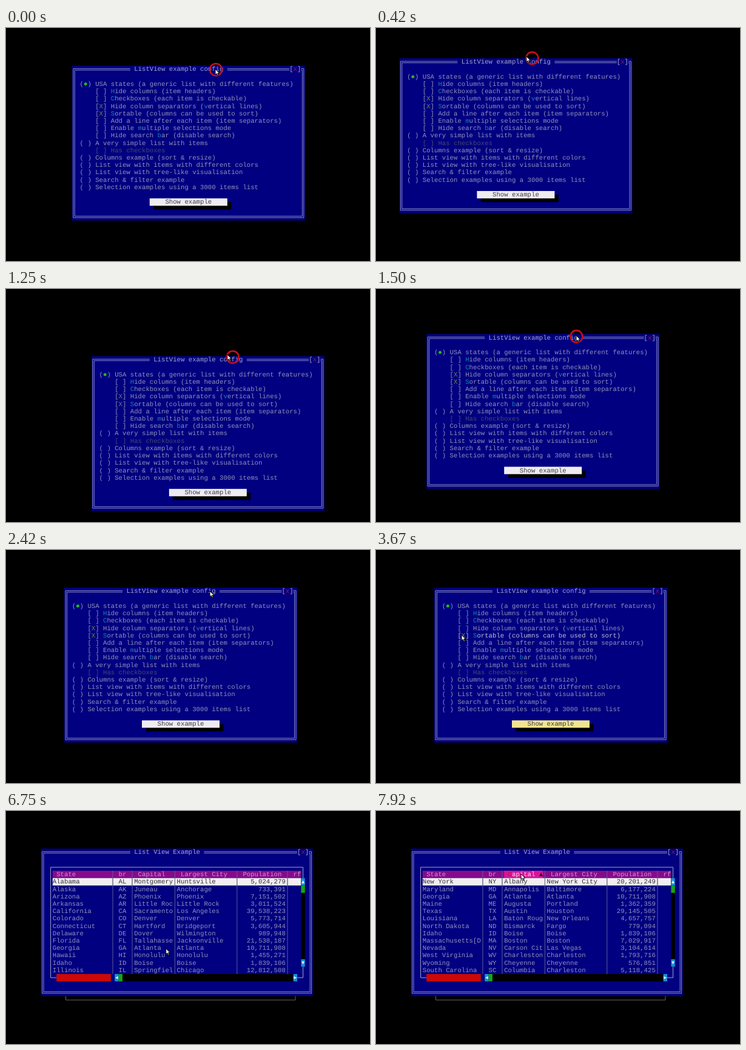
Write an HTML page with a canvas that moves like this. It is 600 by 386 pixels and loops after 8000 ms.

```html
<!DOCTYPE html>
<html lang="en">
<head>
<meta charset="utf-8">
<title>List view demo</title>
<style>
  html, body { margin: 0; width: 100%; height: 100%; overflow: hidden; background: #000; }
  canvas { display: block; width: 600px; height: 386px; }
</style>
</head>
<body>
<canvas id="stage" width="600" height="386"></canvas>
<script>
const ctx = document.getElementById('stage').getContext('2d');
const LOOP = 8000, CW = 6.4, CH = 12.22, TOP = 1.2;
const INK = '#9292bc', BRIGHT = '#c2c2d6', WHITE = '#f4f4f4', NAVY = '#000080', LINE = '#8c8cc4';
const DRAG_END = 2420, UNCHECK = 3420, PRESS = 5580, OPEN = 5830, SORT = 7420;

// Character grid helpers
const px = c => c * CW;
const py = r => TOP + r * CH;
const mid = r => py(r) + CH / 2;

function fill(c, r, w, h, color) {
  ctx.fillStyle = color;
  ctx.fillRect(px(c), py(r), w * CW, h * CH);
}

function text(c, r, str, color = INK) {
  ctx.fillStyle = color;
  [...str].forEach((ch, i) => {
    if (ch !== ' ') ctx.fillText(ch, px(c + i), py(r) + 9.1);
  });
}

function stroke(points, color, width = 1) {
  ctx.strokeStyle = color;
  ctx.lineWidth = width;
  ctx.beginPath();
  points.forEach(([x, y]) => ctx.lineTo(x, y));
  ctx.stroke();
}

function arrow(c, r, angle, color, size = 3) {
  ctx.save();
  ctx.translate(px(c + .5), mid(r));
  ctx.rotate(angle);
  ctx.fillStyle = color;
  ctx.beginPath();
  ctx.moveTo(0, -size);
  ctx.lineTo(size, size);
  ctx.lineTo(-size, size);
  ctx.fill();
  ctx.restore();
}

// Motion: [time, x, y] points joined by straight moves
const windowPath = [
  [0, 17, 5], [80, 17, 5], [420, 6, 4], [580, 0, 2], [660, 0, 2], [830, 10, 2],
  [920, 16, 3], [1080, 22, 6], [1170, 23, 9], [1250, 22, 9], [1330, 18, 8],
  [1420, 14, 6], [1500, 13, 6], [1580, 12, 6], [1670, 14, 6], [1830, 15, 6], [2000, 15, 5]
];
const mousePath = [
  [0, 345, 68], [80, 340, 68], [420, 248, 47], [560, 228, 31], [660, 240, 31],
  [920, 377, 62], [1080, 387, 110], [1170, 385, 117], [1330, 345, 100], [1450, 329, 78],
  [1500, 330, 77], [1580, 326, 79], [1670, 333, 80], [2000, 336, 68], [2580, 336, 68],
  [3250, 141, 129], [3420, 141, 129], [3580, 141, 140.5], [4830, 141, 140.5],
  [5250, 205, 245], [5500, 276, 290], [6500, 276, 290], [7250, 239, 104]
];

function along(path, t) {
  const n = path.findIndex(p => p[0] > t);
  if (n === 0) return path[0].slice(1);
  if (n < 0) return path[path.length - 1].slice(1);
  const a = path[n - 1], b = path[n], k = (t - a[0]) / (b[0] - a[0]);
  return [a[1] + (b[1] - a[1]) * k, a[2] + (b[2] - a[2]) * k];
}

function frame(c, r, w, h, title) {
  fill(c, r, w, h, NAVY);
  const x1 = px(c + .5), x2 = px(c + w - .5), y1 = mid(r) + .2, y2 = mid(r + h - 1) + .2;
  const t1 = c + Math.round((w - title.length) / 2) - 3;
  const start = px(t1 - 1), end = px(t1 + title.length + 1);
  for (const d of [-1.2, 1.2]) {
    stroke([[start, y1 + d], [x1 + d, y1 + d], [x1 + d, y2 - d],
            [x2 - d, y2 - d], [x2 - d, y1 + d], [px(c + w - 1), y1 + d]], LINE);
    stroke([[end, y1 + d], [px(c + w - 4), y1 + d]], LINE);
  }
  text(t1, r, title, '#a8a8cc');
  text(c + w - 4, r, '[ ]', '#a8a8cc');
  text(c + w - 3, r, 'x', '#a01458');
}

// Option rows: kind (r radio, c check, d disabled), label, index of the hotkey
const options = [
  ['r', 'USA states (a generic list with different features)'],
  ['c', 'Hide columns (item headers)', 0],
  ['c', 'Checkboxes (each item is checkable)', 0],
  ['c', 'Hide column separators (vertical lines)', 24],
  ['c', 'Sortable (columns can be used to sort)', 0],
  ['c', 'Add a line after each item (item separators)'],
  ['c', 'Enable multiple selections mode', 7],
  ['c', 'Hide search bar (disable search)', 12],
  ['r', 'A very simple list with items'],
  ['d', 'Has checkboxes'],
  ['r', 'Columns example (sort & resize)'],
  ['r', 'List view with items with different colors'],
  ['r', 'List view with tree-like visualisation'],
  ['r', 'Search & filter example'],
  ['r', 'Selection examples using a 3000 items list']
];

function drawOption(i, c, r, hot, t) {
  const [kind, label, key] = options[i];
  const radio = kind === 'r', x = c + (radio ? 2 : 6);
  const color = kind === 'd' ? '#484870' : hot ? BRIGHT : INK;
  text(x, r, radio ? '( )' : '[ ]', color);
  [...label].forEach((ch, n) => text(x + 4 + n, r, ch, n === key ? '#1284b8' : color));
  if (i === 0) {
    ctx.fillStyle = '#1fb81f';
    ctx.beginPath();
    ctx.arc(px(x + 1.5), mid(r), 2.5, 0, 7);
    ctx.fill();
  }
  if (i === 4 || (i === 3 && t < UNCHECK)) text(x + 1, r, 'X', '#6c8450');
}

function drawConfig(t, mouse) {
  const [c, r] = along(windowPath, t).map(Math.round);
  frame(c, r, 60, 21, 'ListView example config');
  const over = t < DRAG_END ? -1 : Math.floor((mouse[1] - TOP) / CH) - r - 2;
  options.forEach((o, i) => drawOption(i, c, r + 2 + i, i === over, t));

  const pressed = t >= PRESS, x = c + 20 + (pressed ? 1 : 0), y = r + 18;
  if (!pressed) {
    ctx.fillStyle = '#000';
    ctx.fillRect(px(x + 1), py(y) + CH / 2, 20 * CW, CH);
  }
  const warm = t >= 2600 && !pressed;
  fill(x, y, 20, 1, warm ? '#f2e48e' : '#eeecf0');
  text(x + 4, y, 'Show example', '#3c3c44');
}

// State, code, capital, largest city, population
const parse = rows => rows.trim().split('\n').map(s => s.trim().split('|'));
const byName = parse(`
  Alabama|AL|Montgomery|Huntsville|5,024,279
  Alaska|AK|Juneau|Anchorage|733,391
  Arizona|AZ|Phoenix|Phoenix|7,151,502
  Arkansas|AR|Little Rock|Little Rock|3,011,524
  California|CA|Sacramento|Los Angeles|39,538,223
  Colorado|CO|Denver|Denver|5,773,714
  Connecticut|CT|Hartford|Bridgeport|3,605,944
  Delaware|DE|Dover|Wilmington|989,948
  Florida|FL|Tallahassee|Jacksonville|21,538,187
  Georgia|GA|Atlanta|Atlanta|10,711,908
  Hawaii|HI|Honolulu|Honolulu|1,455,271
  Idaho|ID|Boise|Boise|1,839,106
  Illinois|IL|Springfield|Chicago|12,812,508`);
const byCapital = parse(`
  New York|NY|Albany|New York City|20,201,249
  Maryland|MD|Annapolis|Baltimore|6,177,224
  Georgia|GA|Atlanta|Atlanta|10,711,908
  Maine|ME|Augusta|Portland|1,362,359
  Texas|TX|Austin|Houston|29,145,505
  Louisiana|LA|Baton Rouge|New Orleans|4,657,757
  North Dakota|ND|Bismarck|Fargo|779,094
  Idaho|ID|Boise|Boise|1,839,106
  Massachusetts[D]|MA|Boston|Boston|7,029,917
  Nevada|NV|Carson City|Las Vegas|3,104,614
  West Virginia|WV|Charleston|Charleston|1,793,716
  Wyoming|WY|Cheyenne|Cheyenne|576,851
  South Carolina|SC|Columbia|Charleston|5,118,425`);

// Columns: first cell, width, title
const columns = [
  [12, 15, 'State'], [28, 4, 'br'], [33, 10, 'Capital'],
  [44, 15, 'Largest City'], [60, 12, 'Population'], [73, 3, 'rf']
];

function drawList(t, mouse) {
  // Bottom edge of the inactive window behind
  const y = mid(25) + .3;
  stroke([[98.5, 306], [98.5, y], [477, y], [477, 306]], '#686868');
  frame(9, 5, 70, 20, 'List View Example');

  const left = px(11.5), right = px(76.5), up = mid(7) + .3, down = mid(22);
  stroke([[px(13), down], [left, down], [left, up], [right, up], [right, down], [px(75), down]], '#a4a4cc');

  const sorted = t >= SORT;
  const over = mouse[1] < py(9) && mouse[0] > px(33) && mouse[0] < px(43);
  const hot = sorted || over;
  fill(12, 8, 64, 1, '#880a8c');
  if (hot) fill(33, 8, 10, 1, '#dc129c');
  columns.forEach(([c, , title]) => text(c + 1, 8, title, '#c89ccc'));
  if (hot) {
    fill(34, 8, 1, 1, '#dc129c');
    text(34, 8, 'C', '#b01840');
    text(35, 8, 'apital', '#f0b4dc');
  }
  if (sorted) arrow(42, 8, 0, '#200018');

  fill(12, 9, 64, 1, '#f0eef0');
  (sorted ? byCapital : byName).forEach((item, i) => item.forEach((value, n) => {
    const [c, w] = columns[n], s = value.slice(0, w);
    const shift = n === 4 ? w - s.length : n === 1 ? 1 : 0;
    text(c + shift, 9 + i, s, i ? INK : '#303038');
  }));
  columns.slice(0, 5).forEach(([c, w]) => {
    const x = px(c + w + .5);
    stroke([[x, py(8)], [x, py(22)]], '#5c5c98');
    stroke([[x, py(9)], [x, py(10)]], '#77778c');
  });

  const blue = '#168ee0', green = '#12a41c';
  fill(76, 9, 1, 12, '#000');
  fill(76, 9, 1, 1, blue);
  fill(76, 10, 1, 1, green);
  fill(76, 20, 1, 1, blue);
  arrow(76, 9, 0, WHITE, 2.4);
  arrow(76, 20, Math.PI, WHITE, 2.4);

  fill(13, 22, 14, 1, '#cc0808');
  fill(28, 22, 47, 1, '#000');
  fill(28, 22, 1, 1, blue);
  fill(29, 22, 1, 1, green);
  fill(74, 22, 1, 1, blue);
  arrow(28, 22, -Math.PI / 2, WHITE, 2.4);
  arrow(74, 22, Math.PI / 2, WHITE, 2.4);
}

function drawMouse(t, [x, y]) {
  if (t < DRAG_END) {
    const [cx, cy] = along(mousePath, Math.max(0, t - 32));
    ctx.strokeStyle = '#c4101c';
    ctx.lineWidth = 2.6;
    ctx.beginPath();
    ctx.arc(cx + 1, cy + 1, 10, 0, 7);
    ctx.stroke();
  }
  ctx.beginPath();
  [[0, 0], [0, 9.5], [2.2, 7.5], [3.8, 11], [5.4, 10.3], [3.9, 7], [6.8, 7]]
    .forEach(([dx, dy]) => ctx.lineTo(x + dx, y + dy));
  ctx.closePath();
  ctx.fillStyle = '#f0f0ec';
  ctx.fill();
  ctx.strokeStyle = '#000';
  ctx.lineWidth = 1;
  ctx.stroke();
}

function draw(t) {
  ctx.fillStyle = '#000';
  ctx.fillRect(0, 0, 600, 386);
  ctx.font = '10.667px "Liberation Mono", monospace';
  ctx.textRendering = 'geometricPrecision';
  const mouse = along(mousePath, t);
  if (t < OPEN) drawConfig(t, mouse);
  else drawList(t, mouse);
  drawMouse(t, mouse);
}

const begin = performance.now();
function tick() {
  draw((performance.now() - begin) % LOOP);
  requestAnimationFrame(tick);
}
tick();
</script>
</body>
</html>
```
